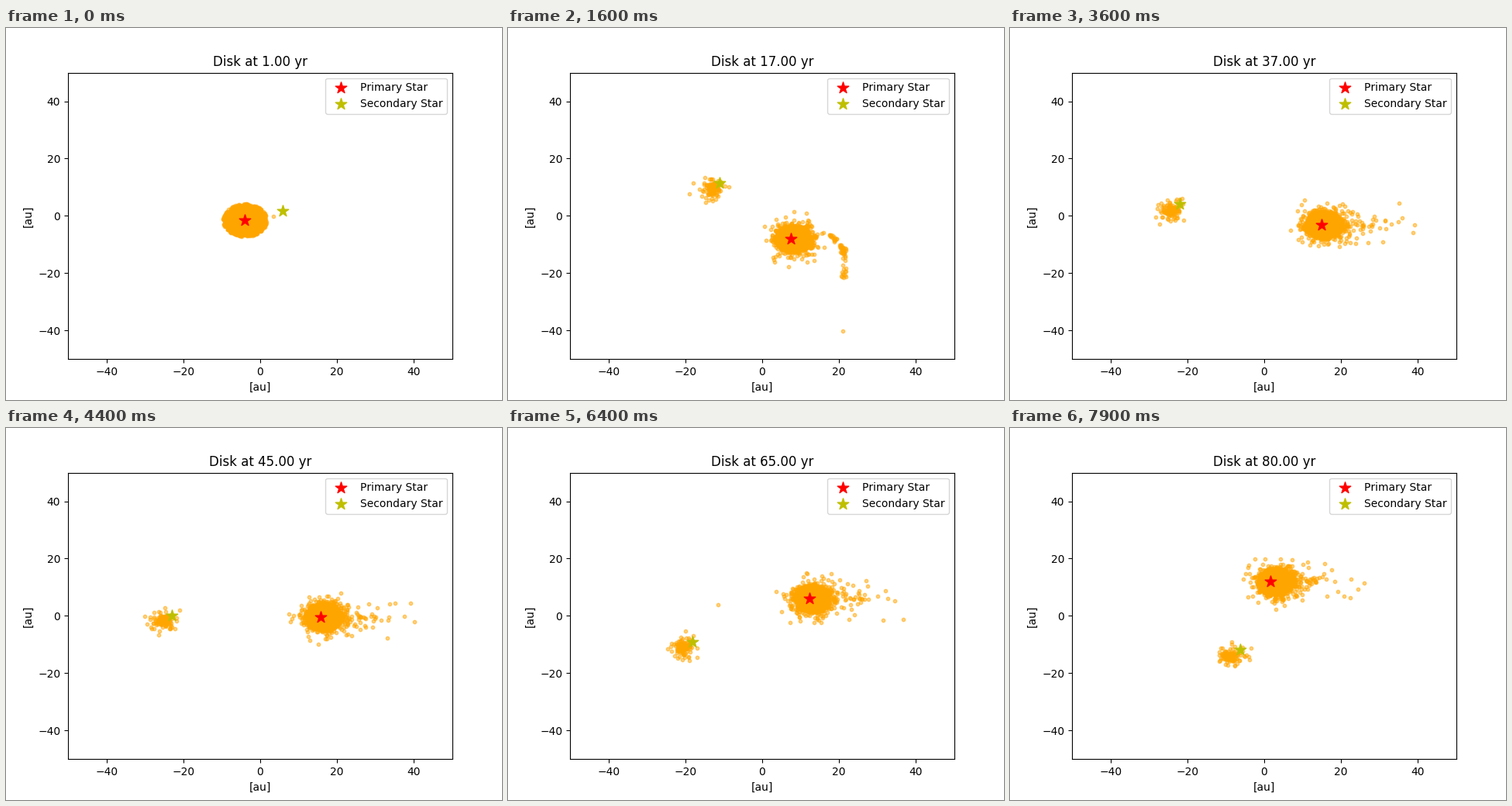
Write a matplotlib script that moves like this. It is 640 px wide and 480 px high and loops after 8000 ms.

```python
import numpy as np
import matplotlib.pyplot as plt
from matplotlib.animation import FuncAnimation

plt.rcParams["text.kerning_factor"] = 6

FRAMES = 80
A, ECC, PERIOD, TILT = 24.5, 0.585, 92.5, np.radians(0.7)
F1, F2 = 0.406, 0.594   # share of the separation for each star
KICK_T = 67.5

rng = np.random.default_rng(11)


def smooth(x):
    x = np.clip(x, 0, 1)
    return x * x * (3 - 2 * x)


def mix(a, b, s):
    return a + (b - a) * s


def polar(r, a):
    return np.column_stack([r * np.cos(a), r * np.sin(a)])


def angles(n):
    return rng.uniform(0, 2 * np.pi, n)


def stars(t):
    """Positions of both stars on their Kepler orbit in year t."""
    mean = 2 * np.pi * t / PERIOD
    E = mean + ECC * np.sin(mean)
    for _ in range(12):
        E -= (E - ECC * np.sin(E) - mean) / (1 - ECC * np.cos(E))
    x = A * (np.cos(E) - ECC)
    y = A * np.sqrt(1 - ECC**2) * np.sin(E)
    c, s = np.cos(TILT), np.sin(TILT)
    sep = np.array([c * x - s * y, s * x + c * y])
    com = np.array([0, -0.15])
    kick = max(0, (t - KICK_T) / (80 - KICK_T)) * np.array([-2.7, 4.0])
    return com - F1 * sep + kick, com + F2 * sep


# Disk around the primary
N = 1150
r_start = 5.7 * np.sqrt(rng.random(N))
r_late = np.where(r_start > 5.1, 4.2 + rng.exponential(1.2, N), 0.9 * r_start)
r_late = np.minimum(r_late, 9.5)
phase, wobble = angles(N), angles(N)
spin = 6.2 / np.maximum(r_start, 0.8)**1.5


def disk(t, primary):
    g = 1 - np.exp(-(t - 1) / 5)
    turn = spin * (t - 1)
    r = mix(r_start, r_late, g) * (1 + 0.08 * g * np.sin(turn + wobble))
    pos = polar(r, phase + turn)
    pos[:, 0] += 0.6 * g + 0.8 * np.clip((t - 66) / 14, 0, 1)
    return primary + pos


# Tidal tail that settles into a loose halo on the right
M = 62
k = np.clip(rng.normal(rng.choice([0.3, 0.55, 0.8], M), 0.05), 0, 0.95)
tail_from = polar(5.4 * np.sqrt(rng.random(M)), angles(M))
tail_arc = np.column_stack([4 + 28.6 * k - 20.4 * k**2, 2.5 - 21.5 * k**2])
tail_arc += rng.normal(0, 0.35, (M, 2))
halo_x = np.minimum(5 + rng.exponential(4.8, M), 22)
halo_y = rng.normal(0, 3.8, M)
halo_p = angles(M)


def tail(t, primary):
    pos = mix(tail_from, tail_arc, smooth((t - 1) / 16))
    halo = np.column_stack([halo_x * (1 + 0.12 * np.sin(0.12 * t + halo_p)),
                            halo_y * np.cos(0.1 * t + halo_p)])
    return primary + mix(pos, halo, smooth((t - 17) / 12))


# Particles captured by the secondary
C = 115
cap_from = polar(5.3 * np.sqrt(rng.random(C)), rng.uniform(-1.2, 1.6, C))
cap_end = np.minimum(7 + rng.exponential(2.4, C), 21)
cap_r = np.abs(rng.normal(0, 1.7, C)) + 0.3
cap_p = angles(C)
cap_w = 5 / np.maximum(cap_r, 0.8)**1.5
CAP_OFFSET = np.array([-2.4, -2.0])


def captured(t, primary, secondary):
    s = smooth((t - 1) / (cap_end - 1))[:, None]
    end = secondary + CAP_OFFSET * smooth((t - 1) / 12) + polar(cap_r, cap_p + cap_w * t)
    return mix(primary + cap_from, end, s)


def strays(t, primary, secondary):
    """One particle falling away early, two flung out sideways late."""
    falling = np.array([-4, -4]) + ((t - 1) / 16)**0.6 * np.array([25, -36.2])
    fling = max(0, t - 65) * np.array([1, 0])
    left = mix(secondary + CAP_OFFSET, np.array([-11.5, 4]), smooth((t - 50) / 15))
    right = mix(primary, np.array([31.5, -1.6]), smooth((t - 5) / 30))
    return np.array([falling, left - 11.7 * fling, right + 6 * fling])


fig, ax = plt.subplots(figsize=(6.4, 4.8), dpi=100)
ax.set_xlim(-50, 50)
ax.set_ylim(-50, 50)
ax.set_xlabel("[au]")
ax.set_ylabel("[au]")
title = ax.set_title("")
dust = ax.scatter([], [], s=10, color="orange", alpha=0.5)


def add_star(color, label):
    return ax.scatter([0], [0], s=120, marker="*", color=color, label=label, zorder=3)


star1 = add_star("r", "Primary Star")
star2 = add_star("y", "Secondary Star")
ax.legend(loc="upper right")


def update(i):
    t = i + 1
    p, s = stars(t)
    dust.set_offsets(np.vstack([disk(t, p), tail(t, p), captured(t, p, s), strays(t, p, s)]))
    star1.set_offsets([p])
    star2.set_offsets([s])
    title.set_text(f"Disk at {t:.2f} yr")
    return dust, star1, star2, title


anim = FuncAnimation(fig, update, frames=FRAMES, interval=100, repeat=True, repeat_delay=0)
plt.show()
```
